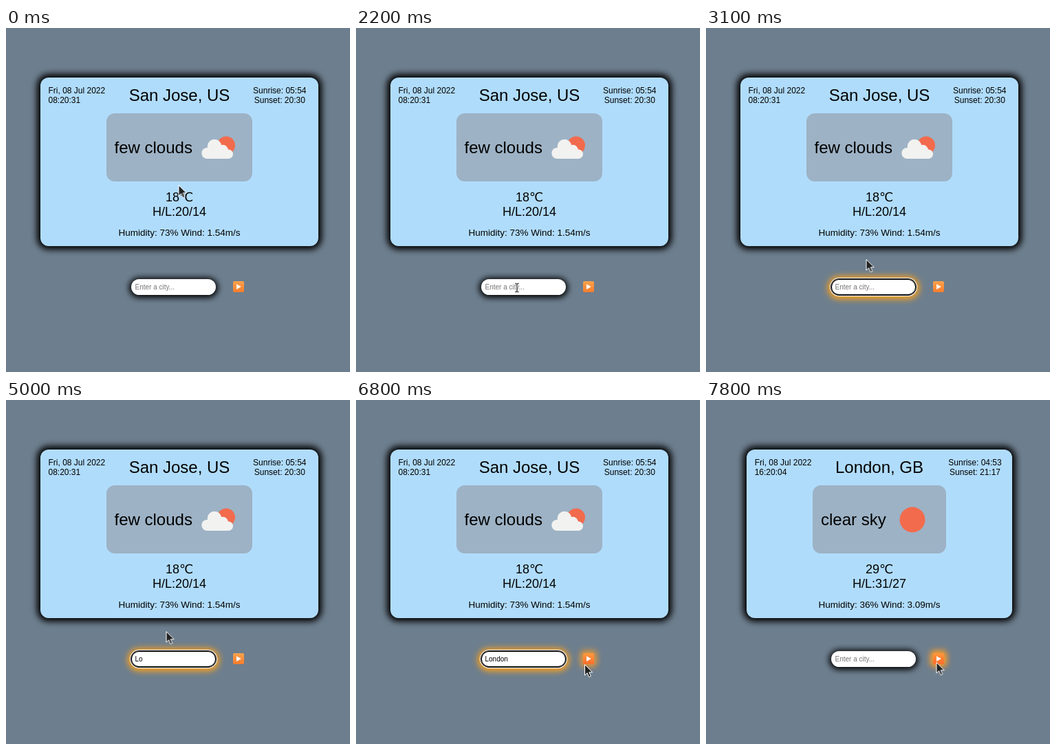
An HTML page for the animation above (8000 ms loop, 500 by 500 pixels).

```html
<!DOCTYPE html>
<html lang="en">
<head>
<meta charset="utf-8">
<title>Weather card</title>
<style>
html, body { margin: 0; width: 100%; height: 100%; overflow: hidden; background: #6d7e8e; }
body { position: relative; font-family: "Liberation Sans", "DejaVu Sans", sans-serif; color: #000; }
div, svg { position: absolute; }
svg { left: 0; top: 0; width: 500px; height: 500px; }

/* every animation shares one 8 s loop */
.loop { animation: 8s step-end infinite; }

.card { top: 72px; height: 245px; border-radius: 12px; background: #b0dcfb; box-shadow: 0 0 10px 5px #000; }
.panel { top: 52px; left: 96px; right: 96px; height: 99px; border-radius: 12px; background: #9db2c5; }
.first .card { left: 50px; width: 404px; }
.second .card { left: 59px; width: 386px; }
.first { animation-name: leave; }
.second { animation-name: enter; }
@keyframes leave { 0% { visibility: visible } 97.5%, 100% { visibility: hidden } }
@keyframes enter { 0% { visibility: hidden } 97.5%, 100% { visibility: visible } }

.small { font-size: 12px; }
.wind { font-size: 13.5px; }
.temp { font-size: 18px; }
.big { font-size: 24px; }
.mid { text-anchor: middle; }

.field, .ring { left: 182px; top: 365px; width: 123px; height: 23px; border-radius: 12px; }
.field { background: #fff; box-shadow: 0 1px 8px 3px #000; animation-name: glow; }
.ring { box-shadow: inset 0 0 0 1px #101010, 0 0 0 1px #101010, 0 0 0 2px #fff; animation-name: focus; }
@keyframes glow {
  0% { box-shadow: 0 1px 8px 3px #000 }
  27.5% { box-shadow: 0 1px 8px 3px #000; animation-timing-function: steps(3, end) }
  31.25% { box-shadow: 0 1px 10px 5px #ffa31a }
  90% { box-shadow: 0 1px 10px 5px #ffa31a; animation-timing-function: steps(3, end) }
  93.75%, 100% { box-shadow: 0 1px 8px 3px #000 }
}
@keyframes focus { 0% { opacity: 0 } 28.75% { opacity: 1 } 91.25%, 100% { opacity: 0 } }

.hint, .typed { left: 187.5px; top: 371px; height: 11px; font-size: 10px; line-height: 11px; white-space: nowrap; }
.hint { color: #757575; animation-name: hint; }
.typed { width: 0; overflow: hidden; border-right: 1px solid transparent; animation-name: type, blink; }
@keyframes hint { 0% { opacity: 1 } 55% { opacity: 0 } 91.25%, 100% { opacity: 1 } }
@keyframes type {
  0% { width: 0 } 55% { width: 1ch } 56.25% { width: 2ch }
  66.25% { width: 4ch } 71.25% { width: 6ch } 91.25%, 100% { width: 0 }
}
@keyframes blink {
  0%, 38.75%, 62.5%, 78.75%, 91.25%, 100% { border-color: transparent }
  28.75%, 46.25%, 66.25%, 86.25% { border-color: #000 }
}

.button { left: 329.5px; top: 368px; width: 16px; height: 16px; border-radius: 2px;
  background: linear-gradient(#fba24c, #f67c2c); }
.halo { left: 329.5px; top: 368px; width: 16px; height: 16px; border-radius: 2px;
  background: linear-gradient(#ff983a, #ff6a2c); box-shadow: 0 0 8px 4px #ff9d24; animation-name: hover; }
@keyframes hover { 0% { opacity: 0 } 85% { opacity: .8 } 86.25%, 100% { opacity: 1 } }

.cursor { animation-name: travel; }
.arrow { animation-name: arrow; }
.beam { animation-name: beam; }
@keyframes travel {
  0% { transform: translate(250.5px, 228px) }
  17.5% { transform: translate(256px, 227px) }
  18.75% { transform: translate(288px, 233px) }
  20% { transform: translate(342px, 262px) }
  21.25% { transform: translate(381px, 305px) }
  22.5% { transform: translate(368px, 344px) }
  23.75% { transform: translate(322px, 362px) }
  25% { transform: translate(264px, 376px) }
  27.5% { transform: translate(234px, 377.5px) }
  33.75% { transform: translate(234px, 386px) }
  35% { transform: translate(233px, 370px) }
  36.25% { transform: translate(232.5px, 354px) }
  37.5% { transform: translate(232.5px, 341px) }
  38.75% { transform: translate(232.5px, 336px) }
  82.5% { transform: translate(246px, 345px) }
  83.75% { transform: translate(296px, 372px) }
  85% { transform: translate(332px, 384px) }
  86.25% { transform: translate(340px, 382px) }
  87.5%, 100% { transform: translate(334.5px, 381px) }
}
@keyframes arrow { 0%, 36.25%, 100% { opacity: 1 } 25% { opacity: 0 } }
@keyframes beam { 0%, 36.25%, 100% { opacity: 0 } 25% { opacity: 1 } }
</style>
</head>
<body>
<div class="first loop">
  <div class="card"><div class="panel"></div></div>
  <svg viewBox="0 0 500 500">
    <g class="small">
      <text x="61.5" y="95">Fri, 08 Jul 2022</text>
      <text x="61.5" y="109">08:20:31</text>
      <text class="mid" x="397.8" y="95">Sunrise: 05:54</text>
      <text class="mid" x="397.8" y="109">Sunset: 20:30</text>
    </g>
    <text class="big mid" x="252" y="106">San Jose, US</text>
    <text class="big" x="157.5" y="182">few clouds</text>
    <circle cx="320" cy="170.5" r="13" fill="#f26b4d"/>
    <g fill="#f2f2f0">
      <circle cx="292.3" cy="182" r="8"/>
      <circle cx="303" cy="172" r="10.3"/>
      <circle cx="315" cy="177.5" r="7.8"/>
      <circle cx="323.3" cy="183.3" r="6.7"/>
      <path d="M292 174h20l11 8v8h-31z"/>
    </g>
    <text class="temp mid" x="252" y="252">18℃</text>
    <text class="temp mid" x="252" y="273">H/L:20/14</text>
    <text class="wind mid" x="252" y="302">Humidity: 73% Wind: 1.54m/s</text>
  </svg>
</div>

<div class="second loop">
  <div class="card"><div class="panel"></div></div>
  <svg viewBox="0 0 500 500">
    <g class="small">
      <text x="70.7" y="95">Fri, 08 Jul 2022</text>
      <text x="70.7" y="109">16:20:04</text>
      <text class="mid" x="391" y="95">Sunrise: 04:53</text>
      <text class="mid" x="391" y="109">Sunset: 21:17</text>
    </g>
    <text class="big mid" x="252" y="106">London, GB</text>
    <text class="big" x="167" y="182">clear sky</text>
    <circle cx="300" cy="174" r="18.5" fill="#f26b4d"/>
    <text class="temp mid" x="252" y="252">29℃</text>
    <text class="temp mid" x="252" y="273">H/L:31/27</text>
    <text class="wind mid" x="252" y="302">Humidity: 36% Wind: 3.09m/s</text>
  </svg>
</div>

<div class="field loop"></div>
<div class="ring loop"></div>
<div class="hint loop">Enter a city...</div>
<div class="typed loop">London</div>

<div class="button"></div>
<div class="halo loop"></div>

<svg viewBox="0 0 500 500">
  <path d="M335 372.3l6.8 3.8-6.8 3.8z" fill="#fff"/>
  <g class="cursor loop">
    <path class="arrow loop" d="M.5.5v15.6l3.6-3.4 2.6 6 2.7-1.2-2.6-5.7h4.9z" fill="#222" stroke="#fff"/>
    <g class="beam loop" fill="none">
      <path id="bar" d="M-3-6h2l1 1 1-1h2M0-5v10M-3 6h2l1-1 1 1h2" stroke="#fff" stroke-width="2.4"/>
      <path d="M-3-6h2l1 1 1-1h2M0-5v10M-3 6h2l1-1 1 1h2" stroke="#111" stroke-width="1.1"/>
    </g>
  </g>
</svg>
</body>
</html>
```
